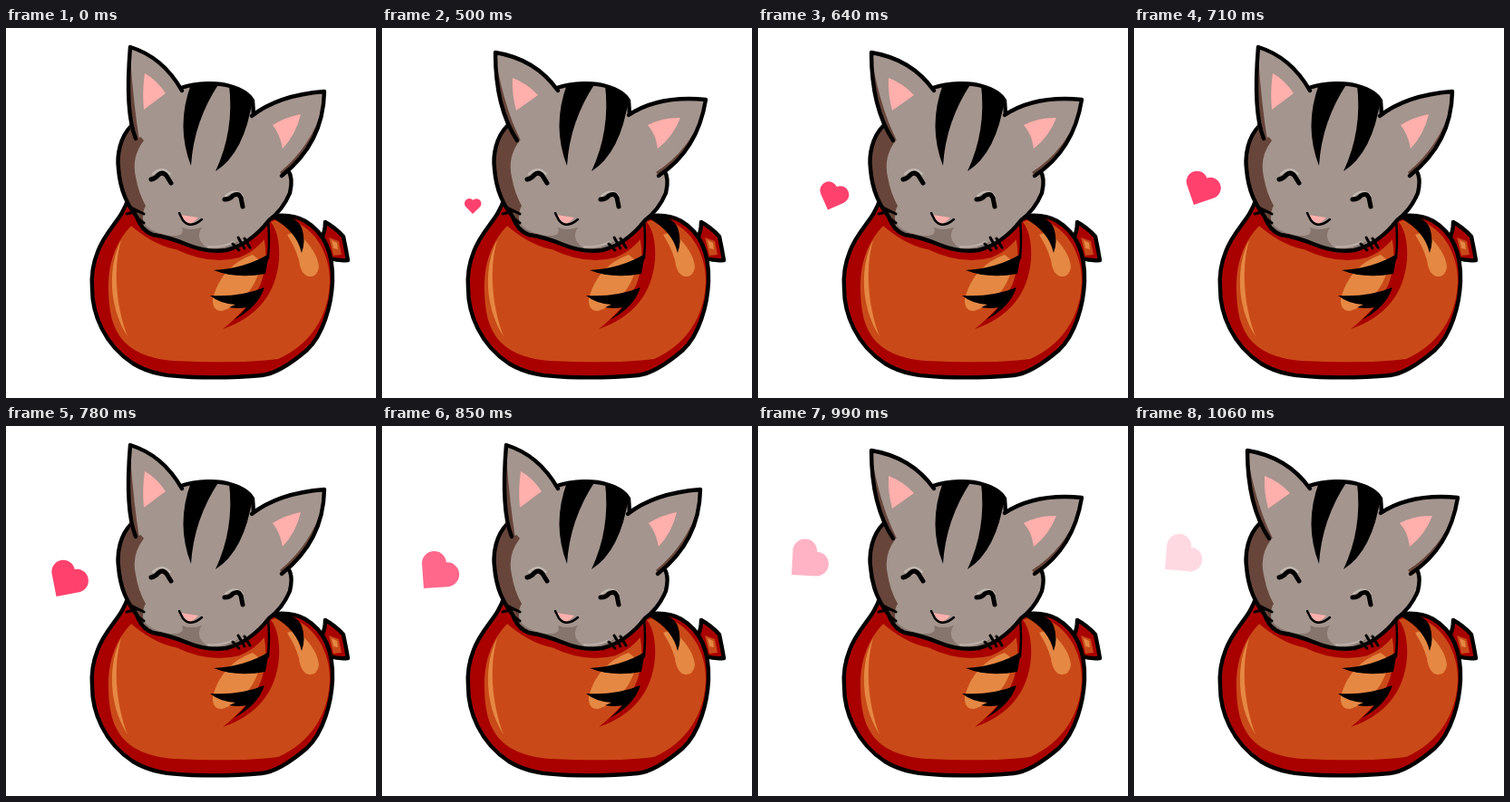
An HTML page that plays this animation: 408x408 px, repeating every 1130 ms.

```html
<!DOCTYPE html>
<html lang="en">
<head>
<meta charset="utf-8">
<title>Happy cat</title>
<style>
  html, body { margin: 0; width: 100%; height: 100%; overflow: hidden; background: #fff; }
  svg { display: block; width: 100vw; height: 100vh; }
  .line { fill: none; stroke: #000; stroke-width: 4.4; stroke-linecap: round; stroke-linejoin: round; }
  .fur { fill: #a4958e; }
  .brown { fill: #67453a; }
  .pink { fill: #ffafac; }
  .red { fill: #a90000; }
  .orange { fill: #c94a18; }
  .glow { fill: #e58844; }
</style>
</head>
<body>
<svg viewBox="0 0 408 408">
  <g id="tailTip">
    <path class="line" style="fill:#a90000" d="M352 214Q363 220 372 230Q375 244 377 256Q367 257 357 254Q355 240 348 232Q352 224 352 214Z"/>
    <path class="orange" d="M356 231L367 235L370 250L361 251Z"/>
    <path class="glow" d="M359 234L365 237L366 244L361 243Z"/>
  </g>

  <g id="body">
    <path class="line" style="fill:#a90000" d="M135 187C128 212 110 222 101 247C95 262 94 275 95 287C95 315 108 349 140 370C160 382 180 384 205 385C235 386 262 385 282 383C300 381 318 367 332 355C350 338 359 305 360 280C361 250 352 226 330 213C320 207 310 206 298 207L288 212Z"/>
    <path class="orange" d="M139 217C120 236 112 262 113 290C114 330 125 362 185 367C230 369 270 369 300 365C335 350 356 318 357 280C358 248 338 214 305 210L290 214L250 246L190 236Z"/>
    <path class="glow" d="M127 234C113 260 112 306 134 340C121 306 118 264 127 234Z"/>
    <path class="glow" d="M310 228Q316 224 326 230Q344 248 345 264Q343 275 334 274Q325 272 323 256Q319 242 310 228Z"/>
    <path class="glow" d="M272 250Q238 262 228 298Q227 312 238 312Q252 308 263 296Q276 284 282 258Z"/>
    <path d="M138 208Q165 233 190 237Q225 254 255 246Q276 238 288 214" fill="none" stroke="#a90000" stroke-width="15"/>
    <path class="red" d="M289 210Q303 225 301 256Q296 312 239 332Q269 308 281 282Q290 255 284 230Z"/>
    <path class="line" style="stroke-width:2.5" d="M289 213Q291 232 289 254"/>
    <path d="M229 267Q264 265 290 249L286 271Q254 277 229 267Z"/>
    <path d="M225 295Q258 297 285 286Q278 308 251 322Q262 313 265 308Q257 310 246 308L253 305Q236 304 225 295Z"/>
    <path d="M293 208Q318 204 326 220Q331 235 326 248Q320 224 296 211Z"/>
  </g>

  <g id="head">
    <path class="fur" d="M193 66C210 60 235 60 247 64C258 67 268 73 272 80L274 96L311 157Q317 165 313 182Q305 201 290 212Q270 238 243 245Q222 248 200 239Q181 231 162 228Q150 224 144 208C134 195 126 180 124 155C122 140 126 120 138 108L160 90Z"/>
    <path class="brown" d="M138 108L152 124Q138 142 143 164Q146 182 154 196Q149 204 152 217L144 208C134 195 126 180 124 155C122 140 126 120 138 108Z"/>
    <path d="M194 220Q204 224 216 220Q207 233 224 244Q246 244 264 229Q246 250 222 247L200 239L162 228Q153 222 152 215Q160 226 182 229Q198 230 194 220Z" fill="#86756d"/>
    <path d="M222 241Q240 242 251 236" fill="none" stroke="#b9aea8" stroke-width="2"/>
    <path d="M204 62Q187 108 204 152Q207 103 235 61Z"/>
    <path d="M246 63Q252 113 231 158Q263 138 272 78Z"/>
    <path class="line" d="M193 66C210 60 235 60 247 64C258 67 268 73 272 80L273 95"/>
    <path class="line" d="M138 108C126 120 122 140 124 155C126 180 134 195 144 208Q150 224 162 228Q181 231 200 239Q222 248 243 245Q270 238 290 212Q305 201 313 182Q317 165 311 157"/>
  </g>

  <g id="earsUp">
    <path class="fur" d="M137 21Q173 32 193 68L180 110L143 122Q131 92 137 21Z"/>
    <path class="brown" d="M137 34Q141 86 147 124L137 112Q132 75 137 34Z"/>
    <path class="line" d="M143 122Q131 92 137 21Q173 32 194 69"/>
    <path class="pink" d="M153 50Q166 57 176 72L152 90Q150 70 153 50Z"/>
    <path class="fur" d="M273 97Q300 74 351 70Q350 127 305 163L276 120Z"/>
    <path class="brown" d="M350 86Q343 130 305 163L302 159Q337 130 350 86Z"/>
    <path class="line" d="M271 97Q300 74 351 70Q350 127 304 163"/>
    <path class="pink" d="M294 107Q309 98 325 95Q320 117 305 133Q302 117 294 107Z"/>
  </g>
  <g id="earsDown">
    <path class="fur" d="M125 27Q169 34 194 69L180 110L149 124Q125 88 125 27Z"/>
    <path class="brown" d="M126 38Q136 91 153 124L143 119Q126 82 126 38Z"/>
    <path class="line" d="M149 124Q125 88 125 27Q169 34 194 69"/>
    <path class="pink" d="M144 55Q160 61 172 74L148 91Q143 73 144 55Z"/>
    <path class="fur" d="M274 95Q305 74 357 79Q348 135 306 163L276 120Z"/>
    <path class="brown" d="M354 94Q341 138 306 163L302 159Q338 136 354 94Z"/>
    <path class="line" d="M272 96Q305 74 357 79Q348 135 305 163"/>
    <path class="pink" d="M293 107Q311 98 329 99Q321 120 304 133Q302 117 293 107Z"/>
  </g>

  <g id="face">
    <g class="line" style="stroke:#c5bbb5;stroke-width:2">
      <path d="M162 161Q172 151 181 161"/>
      <path d="M242 185Q253 176 261 185"/>
    </g>
    <g class="line" style="stroke-width:5">
      <path d="M160 167Q165 166 168 162Q173 158 177 163L182 171"/>
      <path d="M241 189Q247 189 250 185Q256 181 259 187L261 197"/>
    </g>
    <path class="pink" d="M192 206L212 209Q207 215 201 216Z"/>
    <path class="line" style="stroke-width:2.5" d="M191 204L195 212Q203 222 216 211"/>
    <path class="line" style="stroke-width:3" d="M133 205L145 202M138 198L152 205M144 209L152 215M250 238L257 245M256 231L263 243M263 232L269 242"/>
  </g>

  <path id="heart" fill="#ff416e" d="M0 0V-1A.5 .5 0 0 1 1 -1A.5 .5 0 0 1 1 0Z"/>
</svg>
<script>
const LOOP = 1130, REST = 500, STEP = 70;
// Heart pose per step: tip x, tip y, size, tilt, opacity
const poses = [
  [100, 205, 10.8, 1, 1],
  [88, 203, 15.3, 11, 1],
  [77, 200.5, 19.3, 21, 1],
  [66, 195, 23.2, 26, 1],
  [55.5, 188, 25.5, 34, 1],
  [46, 179, 26.8, 41, .8],
  [41, 170.5, 26.8, 45, .6],
  [37, 164, 26.8, 48, .4],
  [34, 158, 26.8, 50, .2]
];
const [heart, earsUp, earsDown] = ["heart", "earsUp", "earsDown"].map(id => document.getElementById(id));
const show = (el, on) => el.setAttribute("display", on ? "inline" : "none");

function draw() {
  const step = Math.floor((performance.now() % LOOP - REST) / STEP);
  const active = step >= 0;
  const down = active && Math.floor(step / 3) % 2 === 0;
  show(earsDown, down);
  show(earsUp, !down);
  show(heart, active);
  if (active) {
    const [x, y, size, tilt, opacity] = poses[step];
    heart.setAttribute("transform", `translate(${x} ${y}) rotate(${tilt - 45}) scale(${size})`);
    heart.setAttribute("opacity", opacity);
  }
  requestAnimationFrame(draw);
}
draw();
</script>
</body>
</html>
```
